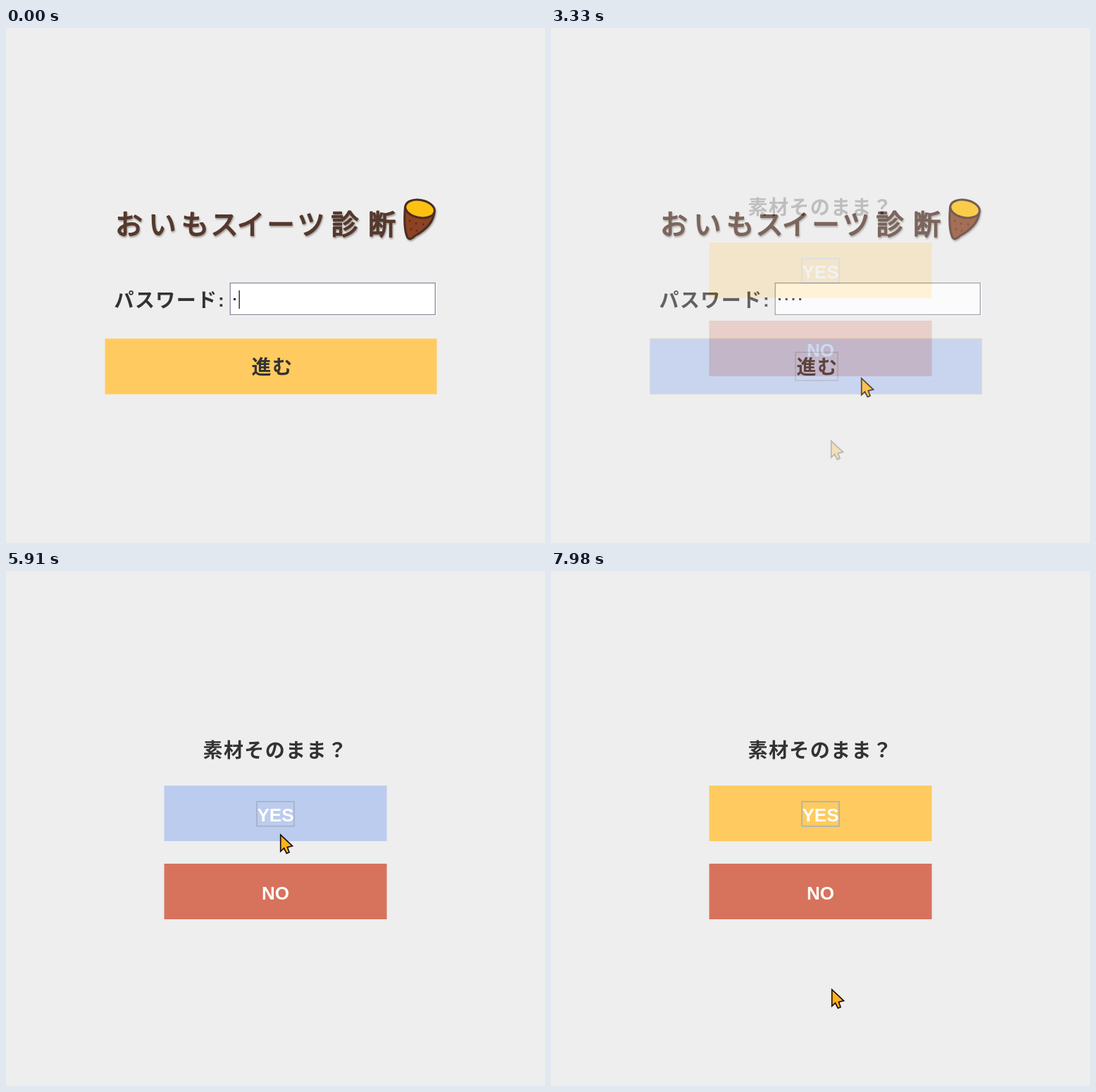
Recreate the animation shown at these times as an HTML page. Size 765x732 px, loop 8 s.

```html
<!DOCTYPE html>
<html lang="ja">
<head>
<meta charset="utf-8">
<title>おいもスイーツ診断</title>
<style>
  html, body { margin: 0; width: 100%; height: 100%; overflow: hidden; background: #eee; }
  svg { display: block; width: 765px; height: 732px; }
  text { font: 700 28px "Noto Sans CJK JP", "Noto Sans CJK", sans-serif; letter-spacing: 1.4px; fill: #333; }
  .latin { font: 700 26px "Liberation Sans", sans-serif; letter-spacing: 0; }
  .light { fill: #fff; }
  .mid { text-anchor: middle; }
  .logo {
    font-size: 39px; font-weight: 500; letter-spacing: 0; text-anchor: middle;
    fill: #55392e; stroke: #55392e; stroke-width: 1.8; stroke-linejoin: round;
  }
  .logo, .potato { filter: drop-shadow(1px 2.5px 1px rgba(70, 50, 45, .45)); }
  .headline { font-size: 36px; letter-spacing: 1.7px; }
  .again { font-size: 25px; letter-spacing: 1.3px; font-weight: 500; fill: #fff; }
  .yellow { fill: #ffcb60; }
  .red { fill: #d7735c; }
  .brown { fill: #996633; }
  .blue { fill: #bcccee; }
  .focus { fill: none; stroke: #a3afc6; stroke-width: 1.6; }
  .photo { filter: drop-shadow(0 5px 4px rgba(0, 0, 0, .55)); }

  .quiz, .result, .caret, .key, .press, .yes, .arrow { animation: 8s linear infinite; }
  .result, .caret, .key, .press, .yes { animation-timing-function: step-end; }

  .quiz { animation-name: quiz; }
  @keyframes quiz {
    0%, 39.125% { opacity: 0; }
    49.125% { opacity: 1; animation-timing-function: step-end; }
    76.5%, 89.4375% { opacity: 0; }
    99.5625%, 100% { opacity: 1; }
  }
  .result { animation-name: result; }
  @keyframes result { 0% { opacity: 0; } 76.5%, 100% { opacity: 1; } }

  .key2 { animation-name: key2; }
  .key3 { animation-name: key3; }
  .key4 { animation-name: key4; }
  @keyframes key2 { 0% { opacity: 0; } 4.125%, 100% { opacity: 1; } }
  @keyframes key3 { 0% { opacity: 0; } 7.5%, 100% { opacity: 1; } }
  @keyframes key4 { 0% { opacity: 0; } 11.25%, 100% { opacity: 1; } }

  .caret { animation-name: caret; }
  @keyframes caret {
    0% { transform: none; opacity: 1; }
    4.125% { transform: translateX(9.7px); opacity: 1; }
    7.5% { transform: translateX(19.4px); opacity: 1; }
    11.25% { transform: translateX(29.1px); opacity: 1; }
    17.55% { transform: translateX(29.1px); opacity: 0; }
    23.875% { transform: translateX(29.1px); opacity: 1; }
    30.125%, 100% { transform: translateX(29.1px); opacity: 0; }
  }

  .press { animation-name: press; }
  @keyframes press { 0% { opacity: 0; } 37.5%, 100% { opacity: 1; } }
  .yes { animation-name: yes; }
  @keyframes yes { 0% { fill: #ffcb60; } 62.25% { fill: #bcccee; } 76.5%, 100% { fill: #ffcb60; } }

  .to-next { animation-name: to-next; }
  @keyframes to-next {
    0%, 18% { transform: translate(420px, 734px); }
    27.75% { transform: translate(431px, 633px); animation-timing-function: cubic-bezier(.3, .3, .6, 1); }
    35.25%, 100% { transform: translate(440px, 497px); }
  }
  .to-yes { animation-name: to-yes; }
  @keyframes to-yes {
    0%, 51.25% { transform: translate(397px, 586px); animation-timing-function: ease-in-out; }
    61.875% { transform: translate(389px, 374px); animation-timing-function: step-end; }
    80%, 100% { transform: translate(398px, 594px); }
  }
  .to-again { animation-name: to-again; }
  @keyframes to-again {
    0% { transform: translate(389px, 374px); }
    79.875% { transform: translate(389px, 374px); animation-timing-function: ease-in; }
    82.5% { transform: translate(383px, 459px); animation-timing-function: ease-out; }
    86.25%, 100% { transform: translate(389px, 594px); }
  }
</style>
</head>
<body>
<svg viewBox="0 0 765 732">
  <defs>
    <path id="arrow" d="M.7 1V24.5L5.5 20 9.3 27.3 13 25.8 10.3 18.6 17.5 16.8Z"
      fill="#ffb31a" stroke="#1c0d12" stroke-width="1.7"/>
    <rect id="page" width="765" height="732" fill="#eee"/>
    <rect id="dot" y="384" width="3" height="3" fill="#222"/>
    <clipPath id="round"><rect x="223" y="190" width="317" height="317" rx="50"/></clipPath>
    <linearGradient id="paper" x2=".5" y2="1">
      <stop stop-color="#edd0b2"/><stop offset=".6" stop-color="#e8c5a3"/><stop offset="1" stop-color="#d9ad88"/>
    </linearGradient>
    <linearGradient id="skin" x2=".6" y2="1">
      <stop stop-color="#a9646c"/><stop offset=".5" stop-color="#a8616b"/><stop offset="1" stop-color="#8a434d"/>
    </linearGradient>
    <radialGradient id="flesh" cx=".38" cy=".32" r=".68">
      <stop stop-color="#ffd54f"/><stop offset=".45" stop-color="#fdba28"/>
      <stop offset=".8" stop-color="#f5a312"/><stop offset="1" stop-color="#d98409"/>
    </radialGradient>
  </defs>

  <g class="login">
    <use href="#page"/>
    <text class="logo" y="293" x="174.5 222 268.5 310 347.5 390 433 481 533.5">おいもスイーツ診断</text>
    <g class="potato" stroke="#4b2c22" stroke-width="3" stroke-linejoin="round">
      <path d="M566.5 254C565 272 566 290 570 298 572 301 576 300 581 295 592 289 606 279 608 262Z" fill="#8c4322"/>
      <ellipse cx="587.5" cy="257" rx="21" ry="12.5" transform="rotate(11 587.5 257)" fill="#fdc112"/>
      <path d="M573 274v.1M582 278v.1M575 286v.1M592 279v.1M583 288v.1" stroke-linecap="round" stroke="#5c2c1c"/>
    </g>
    <text x="153.5" y="397">パスワード</text>
    <text class="latin" x="301" y="396">:</text>
    <path d="M319 408.7H610.7V363" fill="none" stroke="#fff" stroke-width="1.5"/>
    <rect x="318.2" y="362.5" width="291" height="45" fill="#fff" stroke="#888b9e" stroke-width="1.3"/>
    <use href="#dot" x="323"/>
    <use href="#dot" x="332.7" class="key key2"/>
    <use href="#dot" x="342.4" class="key key3"/>
    <use href="#dot" x="352.1" class="key key4"/>
    <rect class="caret" x="330.4" y="373" width="1.5" height="26" fill="#333"/>
    <rect class="yellow" x="140.5" y="441.5" width="471" height="79"/>
    <g class="press">
      <rect class="blue" x="140.5" y="441.5" width="471" height="79"/>
      <rect class="focus" x="347" y="461" width="60" height="40"/>
    </g>
    <text class="mid" x="378" y="492">進む</text>
    <g class="arrow to-next"><use href="#arrow"/></g>
  </g>

  <g class="result">
    <use href="#page"/>
    <text class="headline" x="213" y="142">オススメは焼き芋！</text>
    <g class="photo"><g clip-path="url(#round)">
      <rect x="223" y="190" width="317" height="317" fill="url(#paper)"/>
      <path d="M223 190H400L375 208 290 229 223 236Z" fill="#d8ecf8"/>
      <path d="M395 458 500 388 540 386V455L470 475Z" fill="#c48f68"/>
      <path d="M395 458 450 440 478 452 420 507H340Z" fill="#d0a07a"/>
      <path d="M508 330 540 285V388L506 386Z" fill="#bd741d"/>
      <path d="M508 365 540 375V390L506 388Z" fill="#5a2a18"/>
      <path d="M468 208C482 186 522 186 540 204V290L516 330 500 270Z" fill="#a9686f"/>
      <path d="M500 262 524 258 520 315 510 332Z" fill="#54232a"/>
      <path d="M285 237C276 246 268 275 271 303 250 306 237 325 237 350 246 385 262 412 292 436L395 458C440 452 470 432 490 405L506 372 440 290Z" fill="#6a3314"/>
      <path d="M440 445C462 420 472 380 474 340L500 365C496 395 470 428 440 445Z" fill="#2e130d"/>
      <path d="M506 372C500 405 470 438 425 453" fill="none" stroke="#ad611d" stroke-width="5"/>
      <path d="M283 262C310 244 350 253 385 262 430 276 465 308 473 340 472 380 456 412 440 440 430 454 405 455 396 445 390 464 370 480 345 484 322 476 304 470 280 466 290 452 284 442 293 432 265 412 246 382 250 350 270 330 262 290 283 262Z" fill="url(#flesh)"/>
      <g fill="#ffd052" opacity=".75">
        <path d="M285 290 312 272 325 300 310 340 280 350Z"/>
        <path d="M330 300 360 290 372 320 345 345Z"/>
        <path d="M335 420 352 408 372 426 360 450 340 444Z"/>
        <path d="M398 432 425 420 432 436 410 446Z"/>
      </g>
      <path d="M300 440 320 424 335 445 372 455 390 450 362 472 330 464Z" fill="#de8b0c"/>
      <path d="M285 237C320 213 375 193 432 189 460 190 476 214 488 232 506 262 514 305 512 340 511 360 508 374 505 374 492 342 468 312 440 294 405 268 340 250 285 237Z" fill="url(#skin)"/>
      <path d="M345 222C380 205 420 200 440 212L470 240 430 226 390 236Z" fill="#bb7d80" opacity=".6"/>
      <path d="M285 238C340 248 405 266 440 294 470 314 492 342 505 374" fill="none" stroke="#e2b98a" stroke-width="4"/>
      <path d="M272 494 283 490 280 502Z" fill="#d18a2c"/>
    </g></g>
    <rect class="brown" x="222.5" y="547.5" width="316" height="79.5"/>
    <text class="again" x="277" y="598">もう一度診断する</text>
    <g class="arrow to-again"><use href="#arrow"/></g>
  </g>

  <g class="quiz">
    <use href="#page"/>
    <text x="279.5" y="265">素材そのまま？</text>
    <rect class="yes" x="224.5" y="305" width="316" height="79"/>
    <rect class="focus" x="356" y="327.7" width="53" height="35"/>
    <text class="latin light mid" x="382.5" y="355.5">YES</text>
    <rect class="red" x="224.5" y="416" width="316" height="79"/>
    <text class="latin light mid" x="382.5" y="466.5">NO</text>
    <g class="arrow to-yes"><use href="#arrow"/></g>
  </g>
</svg>
</body>
</html>
```
